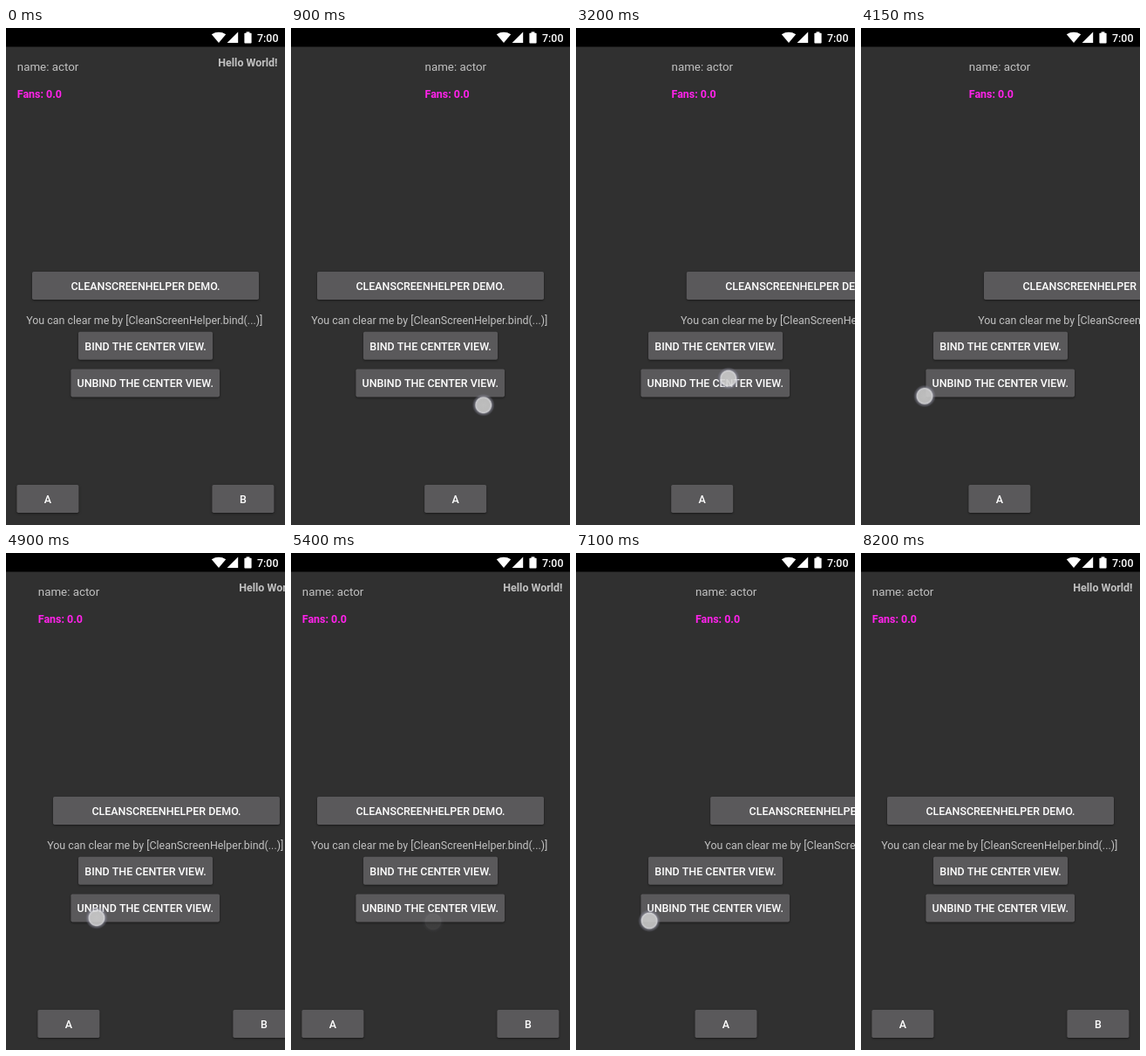
An HTML page with a canvas that plays this animation: 320 by 569 pixels, repeating every 8500 ms.

```html
<!DOCTYPE html>
<html lang="en">
<head>
<meta charset="utf-8">
<title>Clear screen by swiping</title>
<style>
  html, body { margin: 0; width: 100%; height: 100%; overflow: hidden; background: #303030; }
  canvas { display: block; width: 320px; height: 569px; }
</style>
</head>
<body>
<canvas id="stage"></canvas>
<script>
const W = 320, H = 569, LOOP = 8500, STEP = 50;
const SETTLE = 150, FADE = 200;
const canvas = document.getElementById('stage');
const ctx = canvas.getContext('2d');
const dpr = window.devicePixelRatio || 1;
canvas.width = W * dpr;
canvas.height = H * dpr;

// x and y run from press to release; the panel rests at "to" afterwards.
const swipes = [
  { start: 200,  end: 1050, x: [80, 272],   y: [420, 436], from: 0,   to: 320, pow: 1.6 },
  { start: 1350, end: 1860, x: [274, 57.5], y: [430, 416], from: 320, to: 0,   pow: 1.3 },
  { start: 2780, end: 3350, x: [78, 231],   y: [410, 396], from: 0,   to: 320, pow: 1.5, all: true },
  { start: 3650, end: 4190, x: [282, 51],   y: [425, 421], from: 320, to: 0,   pow: 1.3, all: true },
  { start: 4700, end: 5220, x: [80, 163],   y: [416, 422], from: 0,   to: 0,   pow: 1.3, all: true },
  { start: 5530, end: 6150, x: [86, 263],   y: [425, 448], from: 0,   to: 320, pow: 1.5, all: true },
  { start: 6750, end: 7130, x: [280, 62],   y: [430, 420], from: 320, to: 0,   pow: 1.3, all: true }
];
const taps = [
  { start: 2500, end: 2650, x: [160, 160], y: [365, 365], pow: 1 },
  { start: 7650, end: 7850, x: [171, 171], y: [415, 415], pow: 1 }
];

const clamp = v => Math.max(0, Math.min(1, v));
const mix = ([a, b], k) => a + (b - a) * k;
const progress = (g, t) => clamp((t - g.start) / (g.end - g.start)) ** g.pow;

function panelState(t) {
  const swipe = swipes.filter(s => t >= s.start).pop();
  if (!swipe) return { side: 0, center: 0 };
  const dragged = swipe.from + mix(swipe.x, progress(swipe, t)) - swipe.x[0];
  const k = clamp((t - swipe.end) / SETTLE);
  const side = mix([dragged, swipe.to], 1 - (1 - k) ** 2);
  return { side, center: swipe.all ? side : 0 };
}

function label(str, x, y, { size = 12.44, weight = 400, color = '#c1c1c1', align = 'left' } = {}) {
  ctx.font = `${weight} ${size}px Roboto, sans-serif`;
  ctx.fillStyle = color;
  ctx.textAlign = align;
  ctx.fillText(str, x, y);
}

function button(str, x, y, w) {
  const h = 32;
  ctx.save();
  ctx.shadowColor = 'rgba(0,0,0,.5)';
  ctx.shadowBlur = 2.5 * dpr;
  ctx.shadowOffsetY = dpr;
  ctx.fillStyle = '#5a595b';
  ctx.beginPath();
  ctx.roundRect(x, y, w, h, 1.8);
  ctx.fill();
  ctx.restore();
  label(str, x + w / 2, y + 20.7, { weight: 500, color: '#fff', align: 'center' });
}

function shape(points) {
  ctx.beginPath();
  points.forEach(([x, y]) => ctx.lineTo(x, y));
  ctx.fill();
}

function statusBar() {
  ctx.fillStyle = '#000';
  ctx.fillRect(0, 0, W, 21.5);
  ctx.fillStyle = '#fff';
  ctx.beginPath();
  ctx.moveTo(244, 17);
  ctx.lineTo(235.8, 7.2);
  ctx.quadraticCurveTo(244, 2.4, 252.2, 7.2);
  ctx.fill();
  shape([[253.6, 17], [266.2, 17], [266.2, 4.6]]);
  ctx.fillRect(275.6, 4.4, 3.8, 2);
  ctx.beginPath();
  ctx.roundRect(273.4, 5.7, 8.2, 11.8, 0.8);
  ctx.fill();
  label('7:00', 288, 15.5, { weight: 500, color: '#fff' });
}

function centerPanel(dx) {
  button('CLEANSCREENHELPER DEMO.', 30 + dx, 279, 260);
  label('You can clear me by [CleanScreenHelper.bind(...)]', 23.2 + dx, 339);
}

function sidePanel(dx) {
  label('name: actor', 12.8 + dx, 48.8, { size: 13.33 });
  label('Fans: 0.0', 12.8 + dx, 79.6, { weight: 700, color: '#ff22ea' });
  label('Hello World!', 311.5 + dx, 43.5, { weight: 700, align: 'right' });
  button('A', 12.4 + dx, 523, 71);
  button('B', 236.4 + dx, 523, 71);
}

function finger(g, t) {
  if (t < g.start || t >= g.end + FADE) return;
  const k = progress(g, t);
  const x = mix(g.x, k), y = mix(g.y, k);
  const glow = ctx.createRadialGradient(x, y, 0, x, y, 13);
  glow.addColorStop(0, 'rgba(205,205,205,.9)');
  glow.addColorStop(0.52, 'rgba(205,205,205,.88)');
  glow.addColorStop(0.68, 'rgba(222,222,226,.88)');
  glow.addColorStop(0.78, 'rgba(150,150,165,.5)');
  glow.addColorStop(1, 'rgba(120,120,145,0)');
  ctx.globalAlpha = 1 - clamp((t - g.end) / FADE);
  ctx.fillStyle = glow;
  ctx.beginPath();
  ctx.arc(x, y, 13, 0, Math.PI * 2);
  ctx.fill();
  ctx.globalAlpha = 1;
}

function draw(t) {
  ctx.setTransform(dpr, 0, 0, dpr, 0, 0);
  ctx.fillStyle = '#303030';
  ctx.fillRect(0, 0, W, H);
  const { side, center } = panelState(t);
  centerPanel(center);
  button('BIND THE CENTER VIEW.', 83, 347.8, 154);
  button('UNBIND THE CENTER VIEW.', 74.4, 390.4, 170.6);
  sidePanel(side);
  statusBar();
  [...taps, ...swipes].forEach(g => finger(g, t));
}

const began = performance.now();
function frame() {
  const t = (performance.now() - began) % LOOP;
  draw(Math.floor(t / STEP) * STEP);
  requestAnimationFrame(frame);
}
frame();
</script>
</body>
</html>
```
